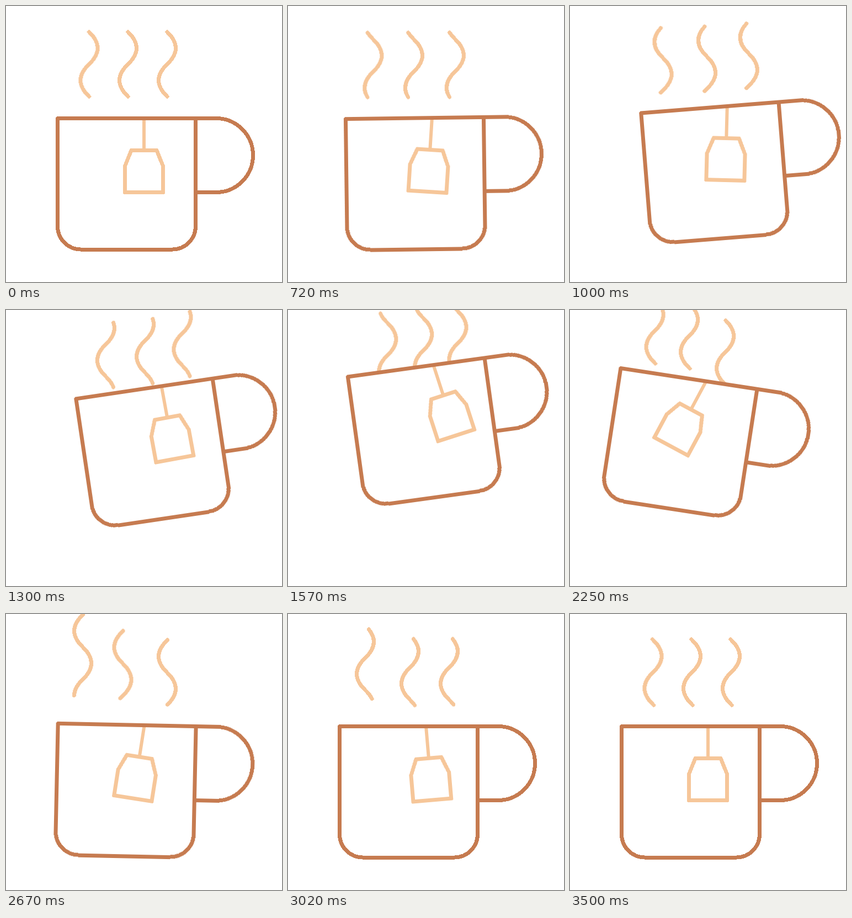
These frames come from a looping animation (500 by 500 pixels, 3700 ms). An HTML page without scripts:

```html
<!DOCTYPE html>
<html lang="en">
<head>
<meta charset="utf-8">
<title>Tea cup</title>
<style>
html, body { margin: 0; width: 100%; height: 100%; overflow: hidden; background: #fff; }
svg { display: block; width: 100%; height: 100%; shape-rendering: crispEdges; }

.line { fill: none; stroke-width: 7; stroke-linejoin: round; }
.clay { stroke: #c67b50; }
.sand { stroke: #f6c699; }
.steam { stroke-linecap: round; }

/* Every moving group swings between its turning points with a sine ease. */
.move { animation: 3.7s cubic-bezier(.37, 0, .63, 1) infinite; }

.cup-x { animation-name: cup-x; }
.cup-y { animation-name: cup-y; }
.cup-turn { animation-name: cup-turn; transform-origin: 218px 322px; }
.bag { animation-name: bag; transform-origin: 250px 203.5px; }

@keyframes cup-x {
  0%, 13.6% { transform: translateX(0); }
  31.6% { transform: translateX(52px); }
  60.8% { transform: translateX(-21px); }
  74.9%, 100% { transform: translateX(0); }
}
@keyframes cup-y {
  0%, 18.1% { transform: translateY(0); }
  51.9% { transform: translateY(-122.5px); }
  74.3%, 100% { transform: translateY(0); }
}
@keyframes cup-turn {
  0%, 15.1% { transform: rotate(0deg); }
  38.6% { transform: rotate(-8.9deg); }
  63.5% { transform: rotate(9.2deg); }
  74.9%, 100% { transform: rotate(0deg); }
}
@keyframes bag {
  0%, 14.05% { transform: rotate(0deg); }
  23.5% { transform: rotate(7deg); }
  48.1% { transform: rotate(-12.5deg); }
  61.9% { transform: rotate(20deg); }
  82.7% { transform: rotate(-5deg); }
  94%, 100% { transform: rotate(0deg); }
}

/* The plumes trail the cup: the right one reacts first, the left one last. */
.left-x { animation-name: left-x; }
.left-y { animation-name: left-y; }
.mid-x { animation-name: mid-x; }
.mid-y { animation-name: mid-y; }
.right-x { animation-name: right-x; }
.right-y { animation-name: right-y; }

@keyframes left-x {
  0%, 14.05% { transform: translateX(0); }
  37.8% { transform: translateX(31.3px); }
  77% { transform: translateX(-13px); }
  93.2%, 100% { transform: translateX(0); }
}
@keyframes left-y {
  0%, 18.9% { transform: translateY(0); }
  59.5% { transform: translateY(-67px); }
  93.2%, 100% { transform: translateY(0); }
}
@keyframes mid-x {
  0%, 14.05% { transform: translateX(0); }
  31.6% { transform: translateX(32px); }
  70% { transform: translateX(-10.5px); }
  81.1%, 100% { transform: translateX(0); }
}
@keyframes mid-y {
  0%, 18.4% { transform: translateY(0); }
  54.3% { transform: translateY(-67px); }
  81.1%, 100% { transform: translateY(0); }
}
@keyframes right-x {
  0%, 14.05% { transform: translateX(0); }
  27.8% { transform: translateX(32px); }
  62.2% { transform: translateX(-11px); }
  72.7%, 100% { transform: translateX(0); }
}
@keyframes right-y {
  0%, 18.1% { transform: translateY(0); }
  47.3% { transform: translateY(-68px); }
  71.6%, 100% { transform: translateY(0); }
}

/* The wave slides down three periods while its visible dash stays in place. */
.wave {
  --stretch: 0px;
  animation: flow 3.7s linear infinite, stretch 3.7s ease-in-out infinite;
}
@keyframes flow {
  0% { transform: translateY(0); stroke-dashoffset: -468px; }
  14.05% {
    transform: translateY(0); stroke-dashoffset: -468px;
    animation-timing-function: cubic-bezier(.333, 0, .667, .333);
  }
  19.84% { transform: translateY(15.3px); stroke-dashoffset: -452.7px; }
  80.2% {
    transform: translateY(335.7px); stroke-dashoffset: -132.3px;
    animation-timing-function: cubic-bezier(.333, .667, .667, 1);
  }
  86%, 100% { transform: translateY(351px); stroke-dashoffset: -115.8px; }
}
@keyframes stretch {
  0%, 61% { stroke-dasharray: 117px 999px; }
  73% { stroke-dasharray: calc(117px + var(--stretch)) 999px; }
  86%, 100% { stroke-dasharray: 119.4px 999px; }
}
</style>
</head>
<body>
<svg viewBox="0 0 500 500">
  <defs>
    <path id="wave" pathLength="702" d="M0-421c20.7 19.5 20.7 39 0 58.5s-20.7 39 0 58.5 20.7 39 0 58.5-20.7 39 0 58.5 20.7 39 0 58.5-20.7 39 0 58.5 20.7 39 0 58.5-20.7 39 0 58.5 20.7 39 0 58.5-20.7 39 0 58.5 20.7 39 0 58.5-20.7 39 0 58.5"/>
    <path id="body" d="M93.5 203.5H343.5V399a42 42 0 0 1-42 42H135.5a42 42 0 0 1-42-42Z"/>
  </defs>

  <g class="line sand steam">
    <g class="move left-x"><g class="move left-y">
      <use class="wave" href="#wave" x="150.5" style="--stretch: 30px"/>
    </g></g>
    <g class="move mid-x"><g class="move mid-y">
      <use class="wave" href="#wave" x="221" style="--stretch: 6px"/>
    </g></g>
    <g class="move right-x"><g class="move right-y">
      <use class="wave" href="#wave" x="292"/>
    </g></g>
  </g>

  <g class="move cup-x"><g class="move cup-y"><g class="move cup-turn">
    <use href="#body" fill="#fff"/>
    <g class="move bag"><g class="line sand">
      <path stroke-width="6" d="M250 203.5V261"/>
      <path d="M227 261.5H273L284.5 290V337.5H215.5V290Z"/>
    </g></g>
    <g class="line clay">
      <use href="#body"/>
      <path d="M343.5 203.5H380.5a67 67 0 0 1 0 134H343.5"/>
    </g>
  </g></g></g>
</svg>
</body>
</html>
```
